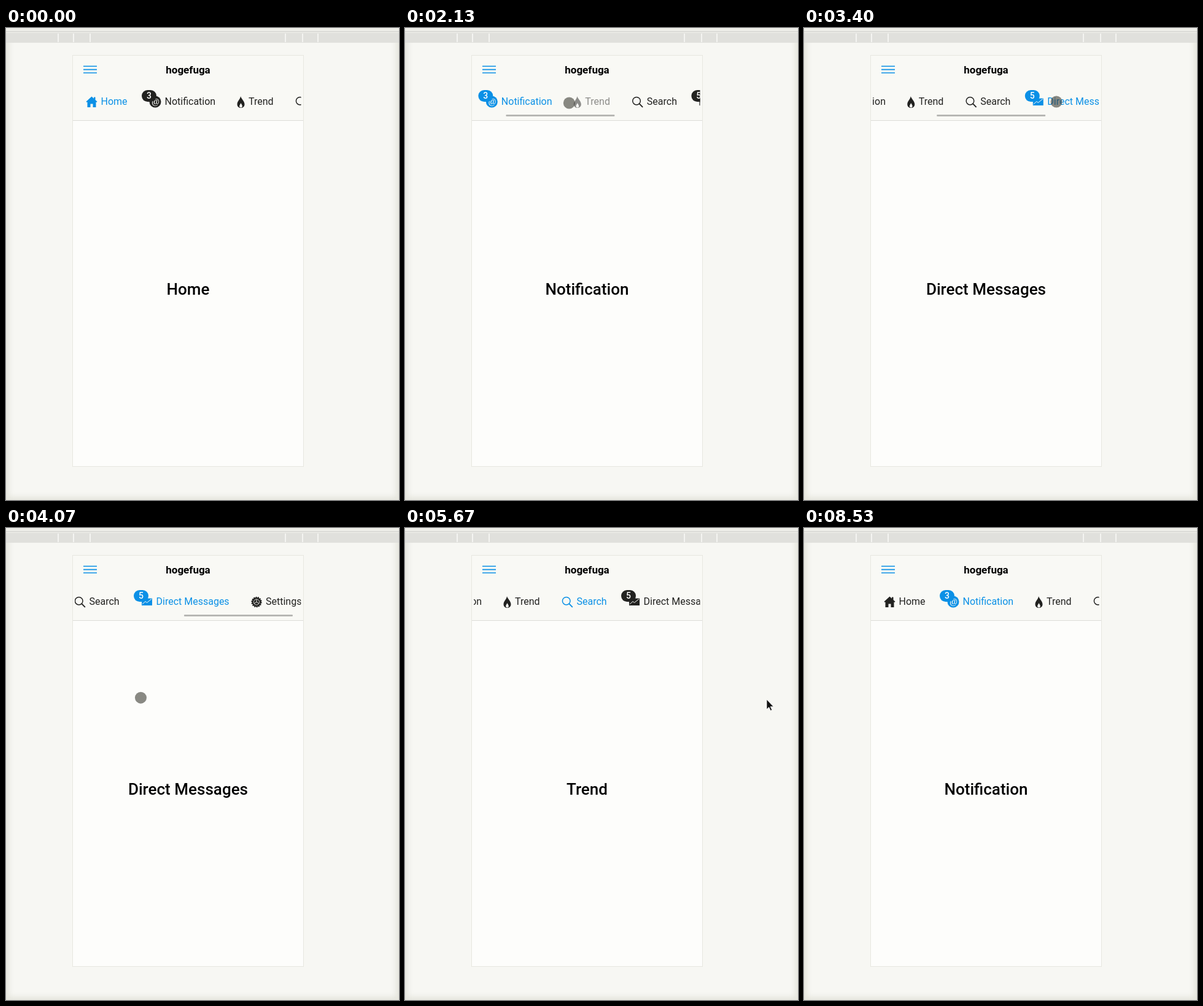
An HTML page that plays this animation: 640x768 px, repeating every 9460 ms.

```html
<!DOCTYPE html>
<html lang="en">
<head>
<meta charset="utf-8">
<title>Tab bar demo</title>
<style>
html, body { margin: 0; width: 100%; height: 100%; overflow: hidden; background: #f7f7f3; }
svg { display: block; width: 640px; height: 768px; font-family: Roboto, sans-serif; }
.mid { text-anchor: middle; }
#titles { font-size: 26px; font-weight: 500; }
.tab { color: #222220; fill: currentColor; font-size: 16px; }
.tab.on { color: #0b90e6; }
.tab.pressed { opacity: .5; }
.badge { fill: #fff; font-size: 14px; font-weight: 500; }
.line { fill: none; stroke: currentColor; }
.cut { fill: #f9f9f5; }
.cutline { fill: none; stroke: #f9f9f5; }
</style>
</head>
<body>
<svg viewBox="0 0 640 768">
  <defs>
    <clipPath id="strip"><rect x="112" y="96" width="368.5" height="54"/></clipPath>
    <clipPath id="screen"><rect x="109" y="151" width="375" height="562"/></clipPath>
    <filter id="soft"><feGaussianBlur stdDeviation="4"/></filter>
  </defs>
  <rect width="640" height="768" fill="#f7f7f3"/>
  <rect width="640" height="768" fill="none" stroke="#e4e4dc" stroke-width="10" filter="url(#soft)"/>
  <rect width="640" height="8" fill="#eeeee9"/>
  <rect y="5" width="640" height="1.5" fill="#d6d6d2"/>
  <rect y="8" width="640" height="16" fill="#e0e0dc"/>
  <path d="M85 9v14M110 9v14M137 9v14M455 9v14M483 9v14M508 9v14" stroke="#fafaf7" stroke-width="1.5"/>

  <rect x="108.5" y="44.5" width="376" height="669" fill="#fdfdfb" stroke="#e7e7e0"/>
  <rect x="109" y="45" width="375" height="105" fill="#f9f9f5"/>
  <path d="M109 150.5h375" stroke="#dcdcd8"/>
  <path d="M126 62.3h22M126 67.6h22M126 73h22" stroke="#0b90e6" stroke-width="1.6"/>
  <text class="mid" x="296.5" y="74" font-size="17" font-weight="700">hogefuga</text>
  <g clip-path="url(#screen)"><g id="titles" class="mid"></g></g>

  <g clip-path="url(#strip)">
    <g id="tabs">
      <g class="tab">
        <path d="M139.5 111.5l-9 8.3 1 1.2 1-.8v8.8h14v-8.8l1 .8 1-1.2-3-2.8v-4.5h-2.5v2.2z"/>
        <path class="cut" d="M137.5 129v-5.5h4v5.5z"/>
        <text x="154.5" y="125">Home</text>
      </g>
      <g class="tab">
        <circle cx="243" cy="120" r="9.5"/>
        <text class="mid cut" x="243.5" y="124.5" font-size="14" font-style="italic" font-family="Noto Serif, serif">@</text>
        <rect x="221" y="101" width="24" height="19" rx="9.5"/>
        <text class="mid badge" x="233" y="115.3">3</text>
        <text x="258.5" y="125">Notification</text>
      </g>
      <g class="tab">
        <path d="M382 111c1 4 6.5 8 6.5 13 0 4-3 6-6 6s-6-2-6-6c0-5 5-8 5.500-13z"/>
        <path class="cut" d="M382.500 122c.5 2 2.300 3 2.300 5s-1 2.500-2.300 2.500-2.300-.7-2.300-2.500 1.800-3 2.300-5z"/>
        <text x="395" y="125">Trend</text>
      </g>
      <g class="tab">
        <circle class="line" cx="478.7" cy="118.7" r="6.3" stroke-width="1.5"/>
        <path class="line" d="M483.2 123.2l5.6 5.6" stroke-width="1.9"/>
        <text x="495.5" y="125">Search</text>
      </g>
      <g class="tab">
        <rect x="581" y="114.5" width="17" height="11.5"/>
        <path class="cutline" d="M582 124l5-4.500 2.500 2 7.500-6"/>
        <rect x="568" y="101" width="24" height="19" rx="9.5"/>
        <text class="mid badge" x="580" y="115.3">5</text>
        <text x="604.5" y="125">Direct Messages</text>
      </g>
      <g class="tab">
        <circle cx="768" cy="120.5" r="7.5"/>
        <circle class="line" cx="768" cy="120.5" r="7.7" stroke-width="2" stroke-dasharray="2 1.46"/>
        <circle class="cutline" cx="768" cy="120.5" r="4.6" stroke-width=".8"/>
        <path class="cutline" d="M768 120.500v-4.500M768 120.500l4 2.400M768 120.500l-4 2.400" stroke-width=".9"/>
        <text x="783" y="125">Settings</text>
      </g>
    </g>
  </g>
  <rect id="bar" y="141" width="177" height="2.8" rx="1" fill="#b3b3b0"/>
  <circle id="touch" r="9.5" fill="#3c3c34" opacity=".6"/>
  <path id="arrow" d="M0 0v16l3.700-3.400 2.600 5.600 2.400-1.100-2.600-5.400h5z" fill="#111" stroke="#fff" stroke-width=".7"/>
</svg>
<script>
const LOOP = 9460, GLIDE = 400, PAGE_WIDTH = 375, BAR_TIME = 900, BAR_FADE = 200;
const DRAG_START = 1934, DRAG = 208;
const [HOME, NOTIFICATION, TREND, SEARCH, MESSAGES] = [0, 1, 2, 3, 4];

// Scroll that centres each tab, and when each tab becomes selected.
const centred = [0, 0, 108, 216, 360];
const visits = [[0, HOME], [1500, NOTIFICATION], [3392, MESSAGES], [4646, SEARCH], [5675, TREND], [6725, NOTIFICATION]];

// Pages finish sliding as their tab is selected; the strip then scrolls to that tab.
const slides = visits.map(([t, page]) => [t - GLIDE, page]);
const scrolls = visits.map(([t, page]) => [t, centred[page]])
  .concat([[DRAG_START, DRAG]])
  .sort((a, b) => a[0] - b[0]);

// Pointer glides, as [start, x, y]: each swipe back is a press followed by a release.
const swipeBack = ([t], x, y) => [[t - 900, 200, 292], [t - GLIDE - 66, x, y]];
const pointer = [
  [0, 640, 380], [200, 430, 300], [1060, 90, 300], [1500, 369, 122],
  [DRAG_START, 369 - DRAG, 122], [2500, 411, 120],
  ...swipeBack(visits[3], 541, 286),
  ...swipeBack(visits[4], 589, 279),
  ...swipeBack(visits[5], 489, 294),
  [7150, 97, 300]
];

const $ = id => document.getElementById(id);
const tabs = [...document.querySelectorAll('.tab')];
const clamp = v => Math.max(0, Math.min(1, v));
const smooth = s => s * s * (3 - 2 * s);
const settle = s => 1 - (1 - s) ** 2;
const latest = (keys, t) => keys.findLastIndex(key => key[0] <= t);

tabs.forEach((tab, i) => {
  const title = document.createElementNS('http://www.w3.org/2000/svg', 'text');
  title.textContent = tab.lastElementChild.textContent;
  title.setAttribute('x', 296.5 + i * PAGE_WIDTH);
  title.setAttribute('y', 434);
  $('titles').append(title);
});

// Each key [start, ...values] is approached from the previous one over GLIDE ms.
function glide(keys, t, ease = smooth) {
  const i = latest(keys, t);
  const from = keys[Math.max(0, i - 1)], to = keys[i];
  const s = ease(clamp((t - to[0]) / GLIDE));
  return to.slice(1).map((v, k) => from[k + 1] + (v - from[k + 1]) * s);
}

function barOpacity(t) {
  const i = latest(scrolls, t);
  const moved = i > 0 && scrolls[i][1] !== scrolls[i - 1][1];
  return moved ? clamp((scrolls[i][0] + BAR_TIME - t) / BAR_FADE) : 0;
}

function place(el, x, y, visible = true) {
  el.setAttribute('visibility', visible ? 'visible' : 'hidden');
  el.setAttribute('transform', `translate(${x} ${y})`);
}

function draw(t) {
  const [page] = glide(slides, t, settle);
  const [offset] = glide(scrolls, t);
  const [x, y] = glide(pointer, t);
  const selected = visits[latest(visits, t)][1];
  const dragging = t >= DRAG_START && t < DRAG_START + GLIDE;
  tabs.forEach((tab, i) => {
    tab.classList.toggle('on', i === selected);
    tab.classList.toggle('pressed', i === TREND && dragging);
  });
  place($('titles'), -page * PAGE_WIDTH, 0);
  place($('tabs'), -offset, 0);
  place($('bar'), 115 + offset * .486, 0);
  $('bar').setAttribute('opacity', barOpacity(t));

  const visible = t >= 130 && t < 8530;
  const inside = x > 109 && x < 485 && y > 44 && y < 713;
  place($('touch'), x, y, visible && inside);
  place($('arrow'), x, y, visible && !inside);
}

const start = performance.now();
function frame() {
  draw((performance.now() - start) % LOOP);
  requestAnimationFrame(frame);
}
frame();
</script>
</body>
</html>
```
